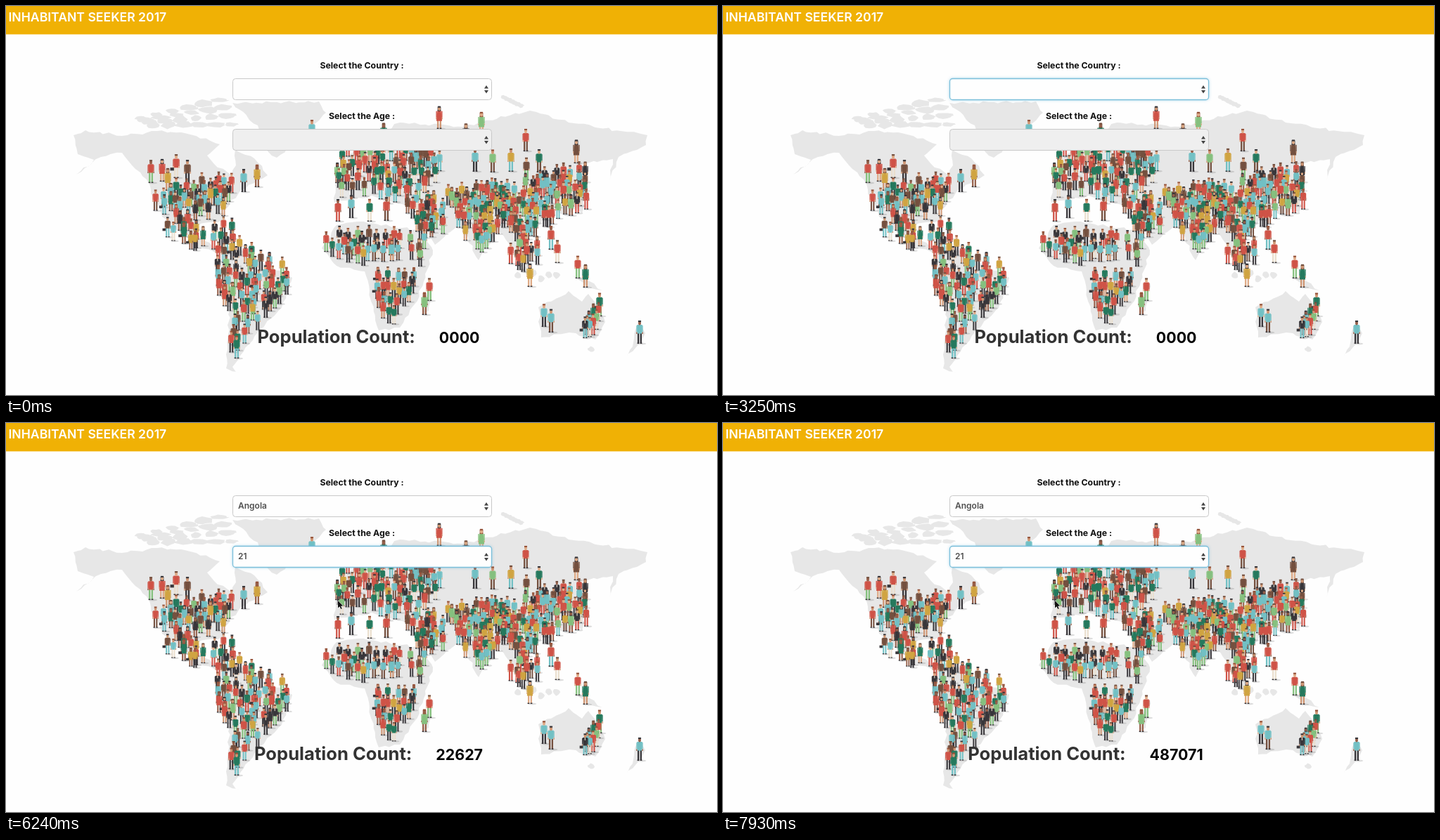
An HTML page with a canvas that plays this animation: 1011 px wide and 554 px high, repeating every 8 s.

```html
<!DOCTYPE html>
<html lang="en">
<head>
<meta charset="utf-8">
<title>Inhabitant Seeker</title>
<style>
  html, body { margin: 0; width: 100%; height: 100%; overflow: hidden; background: #fefefe; }
  canvas { display: block; }
</style>
</head>
<body>
<canvas id="stage" width="1011" height="554"></canvas>
<script>
const W = 1011, H = 554, LOOP = 8000, STEP = 130;
const PAPER = '#fefefe', LAND = '#e7e7e7';
const BLACK = '#38363a', BROWN = '#74503f', CREAM = '#eadfce';
const TOPS = ['#cf5347', '#cf5347', '#cf5347', BLACK, '#25795d', '#25795d', '#72c0c4', '#72c0c4', '#85c07e', '#d0a441', BROWN];
const BOTTOMS = [BLACK, BLACK, BLACK, '#72c0c4', '#cf5347', CREAM, '#85c07e', BROWN];

const ctx = document.getElementById('stage').getContext('2d');
const backdrop = document.createElement('canvas');
backdrop.width = W;
backdrop.height = H;
const map = backdrop.getContext('2d');

let seed = 2024;
function rand() {
  seed = (seed * 1664525 + 1013904223) >>> 0;
  return seed / 4294967296;
}
const jitter = size => (rand() - 0.5) * 2 * size;
const pick = list => list[Math.floor(rand() * list.length)];
const points = text => text.split(' ').map(pair => pair.split(',').map(Number));

// Closed shape; a positive rough breaks its edges into a ragged coast.
function outline(list, rough = 0) {
  const path = new Path2D();
  list.forEach(([x, y], i) => {
    const [nx, ny] = list[(i + 1) % list.length];
    const parts = rough ? Math.max(1, Math.round(Math.hypot(nx - x, ny - y) / 7)) : 1;
    for (let k = 0; k < parts; k++) {
      const wobble = k ? rough : 0;
      path.lineTo(x + (nx - x) * k / parts + jitter(wobble), y + (ny - y) * k / parts + jitter(wobble));
    }
  });
  path.closePath();
  return path;
}

function land(text) {
  map.fillStyle = LAND;
  map.fill(outline(points(text), 2));
}

function isle(x, y, rx, ry) {
  const ring = [];
  for (let a = 0; a < 6.28; a += 0.57) {
    const r = 0.75 + rand() * 0.4;
    ring.push([x + Math.cos(a) * rx * r, y + Math.sin(a) * ry * r]);
  }
  map.fillStyle = LAND;
  map.fill(outline(ring));
}

function drawLand() {
  // The Americas and Greenland
  land('96,184 113,177 165,185 215,178 262,183 304,197 286,213 296,225 321,241 327,227 326,205 353,217 372,241 ' +
       '334,262 308,292 313,306 266,311 273,326 310,354 270,342 222,300 200,247 165,209 135,215 100,240 125,219 102,211');
  land('322,138 445,136 455,152 415,190 385,216 365,203 358,170');
  land('303,350 325,341 378,373 407,387 392,430 362,460 322,514 334,523 313,516 318,425 298,380');
  // Africa
  land('470,312 500,307 590,320 607,348 585,420 560,458 530,462 510,378 470,370 449,345');
  land('600,402 607,394 601,434 592,439');
  // Europe and Asia
  land('467,280 468,254 485,250 484,215 515,190 560,166 650,172 745,149 800,166 912,184 910,198 871,215 858,249 ' +
       '863,218 820,225 828,260 800,300 776,286 745,330 741,375 700,315 672,362 645,311 610,340 584,290 520,270');
  // Oceania
  land('757,429 800,406 819,421 828,410 852,450 838,475 801,465 761,472');
  land('805,384 822,388 848,405 832,402');
  land('898,454 909,466 902,480 880,502 891,485');

  // The Arctic archipelago climbs towards the east.
  for (let i = 0; i < 24; i++) {
    const along = i / 23;
    isle(192 + 128 * along, 160 - 30 * along + (i % 4) * (3 + 10 * along), 8 + 8 * rand(), 3 + 3 * rand());
  }
  for (let i = 0; i < 7; i++) isle(708 + 4 * i, 130 + 2 * i, 5, 3);
  for (let i = 0; i < 6; i++) isle(728 + 11 * i, 386 + jitter(11), 5, 5);
  isle(817, 282, 5, 13);
  isle(832, 489, 5, 4);
}

function person([x, y, h]) {
  const skin = pick(['#dfab87', '#cf9673', '#96604a']);
  const hair = pick([BLACK, BROWN, '#96533a']);
  const top = pick(TOPS), bottom = pick(BOTTOMS);
  const dress = rand() < 0.22;
  const box = (color, bx, by, bw, bh) => {
    map.fillStyle = color;
    map.fillRect(bx, by, bw, bh);
  };
  map.save();
  map.translate(x, y);
  map.scale(h / 32, h / 32);
  map.fillStyle = 'rgba(60,60,60,.17)';
  map.beginPath();
  map.ellipse(3, 0, 6, 1.4, 0, 0, 7);
  map.fill();
  for (const side of [-1, 1]) {
    box(dress ? skin : bottom, side * 1.8 - 1.1, -15, 2.2, 14);
    box(BLACK, side * 2 - 1.3, -1.4, 2.6, 1.4);
    box(top, side * 3.8 - 0.7, -25, 1.4, 9);
    box(skin, side * 4 - 0.7, -16, 1.4, 2.5);
  }
  map.fillStyle = top;
  map.fill(outline(dress ? [[-2.5, -26], [2.5, -26], [4, -11], [-4, -11]] : [[-3.6, -26], [3.6, -26], [2.9, -14], [-2.9, -14]]));
  if (!dress && top === BLACK) box(CREAM, -0.6, -26, 1.2, 4);
  if (dress) box(hair, -2.3, -31, 4.6, 6);
  map.fillStyle = skin;
  map.beginPath();
  map.ellipse(0, -28.5, 1.9, 2.8, 0, 0, 7);
  map.fill();
  box(hair, -2, -32, 4, 2.1);
  if (rand() < 0.1) box(BLACK, -8, -14, 5, 4);
  map.restore();
}

const people = [];

// Spreads feet evenly but irregularly inside an area.
function crowd(count, text) {
  const list = points(text), area = outline(list);
  const xs = list.map(p => p[0]), ys = list.map(p => p[1]);
  const x0 = Math.min(...xs), y0 = Math.min(...ys);
  const spanX = Math.max(...xs) - x0, spanY = Math.max(...ys) - y0;
  const placed = [];
  while (placed.length < count) {
    let best, bestGap = -1;
    for (let tries = 0; tries < 14; tries++) {
      const x = x0 + rand() * spanX, y = y0 + rand() * spanY;
      if (!map.isPointInPath(area, x, y)) continue;
      const gap = Math.min(999, ...placed.map(p => Math.hypot(p[0] - x, (p[1] - y) * 0.7)));
      if (gap > bestGap) {
        bestGap = gap;
        best = [x, y, 29 + jitter(2)];
      }
    }
    if (best) placed.push(best);
  }
  people.push(...placed);
}

const loners = text => points(text).forEach(([x, y]) => people.push([x, y, 33 + jitter(1)]));

function drawPeople() {
  loners('206,252 222,250 230,263 242,245 258,253 338,265 357,258 435,195 537,199 616,175 676,184 654,200 739,207 ' +
         '718,236 740,248 758,237 811,224 692,237 667,236');
  loners('472,307 491,302 517,307 541,306 775,347 784,366 813,388 824,401 745,400 602,420 595,440 765,457 775,465 844,442 901,481 328,502');

  crowd(34, '203,286 275,266 325,262 308,302 278,307 218,296');
  crowd(18, '222,322 245,305 292,338 308,322 326,328 296,360 236,336');
  crowd(64, '300,366 315,345 365,370 404,390 402,408 352,470 326,496 317,494 320,450 301,412');
  crowd(30, '453,350 480,337 600,345 592,376 574,361 512,372 460,365');
  crowd(22, '522,398 582,396 578,420 550,458 536,460');
  crowd(66, '468,246 485,214 600,214 622,240 590,276 545,283 518,272 470,277');
  crowd(20, '568,296 620,285 625,328 590,334');
  crowd(50, '624,285 690,267 722,290 702,330 673,358 652,334');
  crowd(74, '692,282 740,264 785,250 827,248 826,290 770,316 738,348 702,310');
  crowd(11, '717,368 735,342 765,362 741,384');
  crowd(8, '822,475 832,452 846,447 832,478');

  people.sort((a, b) => a[1] - b[1]).forEach(person);
}

drawLand();
drawPeople();

const font = (size, weight = 700) => `${weight} ${size}px Inter, sans-serif`;

function label(text, x, y, face, color, align = 'left') {
  ctx.font = face;
  ctx.fillStyle = color;
  ctx.textAlign = align;
  ctx.fillText(text, x, y);
}

function triangle(x, y, dir) {
  ctx.fillStyle = '#454545';
  ctx.fill(outline([[x - 3, y], [x + 3, y], [x, y + 4.5 * dir]]));
}

function select(title, y, value, { focus = false, disabled = false }) {
  label(title, 506, y - 14, font(12.3), '#111', 'center');
  ctx.save();
  ctx.beginPath();
  ctx.roundRect(322.5, y + 0.5, 368, 30, 4);
  if (focus) {
    ctx.shadowColor = 'rgba(85,175,215,.6)';
    ctx.shadowBlur = 4;
  }
  ctx.fillStyle = disabled ? '#efefef' : PAPER;
  ctx.fill();
  ctx.shadowBlur = 0;
  ctx.strokeStyle = focus ? '#7cbfda' : '#c9c9c9';
  ctx.lineWidth = focus ? 1.3 : 1;
  ctx.stroke();
  ctx.restore();
  triangle(683, y + 14.5, -1);
  triangle(683, y + 17, 1);
  label(value, 330, y + 18.5, font(12, 600), '#505050');
}

function glide(t, start, end, from, to) {
  const p = Math.min(1, Math.max(0, (t - start) / (end - start)));
  return from.map((v, i) => v + (to[i] - v) * p * p * (3 - 2 * p));
}

function pointerAt(t) {
  if (t >= 130 && t < 1040) return glide(t, 130, 780, [600, 262], [506, 124]);
  if (t >= 1040 && t < 3250) return glide(t, 1040, 1430, [506, 124], [488, 121]);
  if (t >= 3900 && t < 5460) return glide(t, 3770, 4160, [462, 143], [480, 194]);
  if (t >= 5850) return glide(t, 5850, 6240, [476, 208], [472, 253]);
  return null;
}

function drawPointer([x, y]) {
  const arrow = outline([[0, 0], [0, 10.5], [2.4, 8.3], [4.2, 12], [5.8, 11.2], [4.1, 7.7], [7.3, 7.4]]);
  ctx.save();
  ctx.translate(x, y);
  ctx.strokeStyle = '#fff';
  ctx.stroke(arrow);
  ctx.fillStyle = '#111';
  ctx.fill(arrow);
  ctx.restore();
}

// Time, count and rate per millisecond along a slow-fast-slow run.
const COUNT = [[5952, 0, 0], [6240, 22627, 154.7], [7150, 301668, 359], [7930, 487071, 61.8]];

function countAt(t) {
  if (t < COUNT[0][0]) return '0000';
  const i = Math.min(COUNT.length - 2, COUNT.findLastIndex(key => key[0] <= t));
  const [t0, v0, r0] = COUNT[i], [t1, v1, r1] = COUNT[i + 1];
  const d = t1 - t0, p = (t - t0) / d, q = 1 - p;
  return String(Math.round(v0 * q * q * (1 + 2 * p) + v1 * p * p * (3 - 2 * p) + d * p * q * (r0 * q - r1 * p)));
}

function drawCount(value) {
  const title = 'Population Count:', titleFont = font(25.6), valueFont = font(21.4), gap = 34;
  ctx.font = titleFont;
  const titleWidth = ctx.measureText(title).width;
  ctx.font = valueFont;
  const x = 515.5 - (titleWidth + gap + ctx.measureText(value).width) / 2;
  label(title, x, 479.5, titleFont, '#333');
  label(value, x + titleWidth + gap, 479.5, valueFont, '#050505');
}

function draw(time) {
  const t = Math.floor(time / STEP) * STEP;
  ctx.fillStyle = PAPER;
  ctx.fillRect(0, 0, W, H);
  ctx.drawImage(backdrop, 0, 0);
  ctx.fillStyle = '#f0b105';
  ctx.fillRect(0, 0, W, 40.4);
  label('INHABITANT SEEKER 2017', 3.5, 22, font(17.6, 600), '#fff');

  const chosen = t >= 3640, ageFocus = t >= 4290;
  select('Select the Country :', 103, chosen ? 'Angola' : '', { focus: t >= 1430 && !ageFocus });
  select('Select the Age :', 175, t >= 5850 ? '21' : '', { focus: ageFocus, disabled: !chosen });
  drawCount(countAt(t));

  const pointer = pointerAt(t);
  if (pointer) drawPointer(pointer);
}

function tick() {
  draw(performance.now() % LOOP);
  requestAnimationFrame(tick);
}
tick();
</script>
</body>
</html>
```
